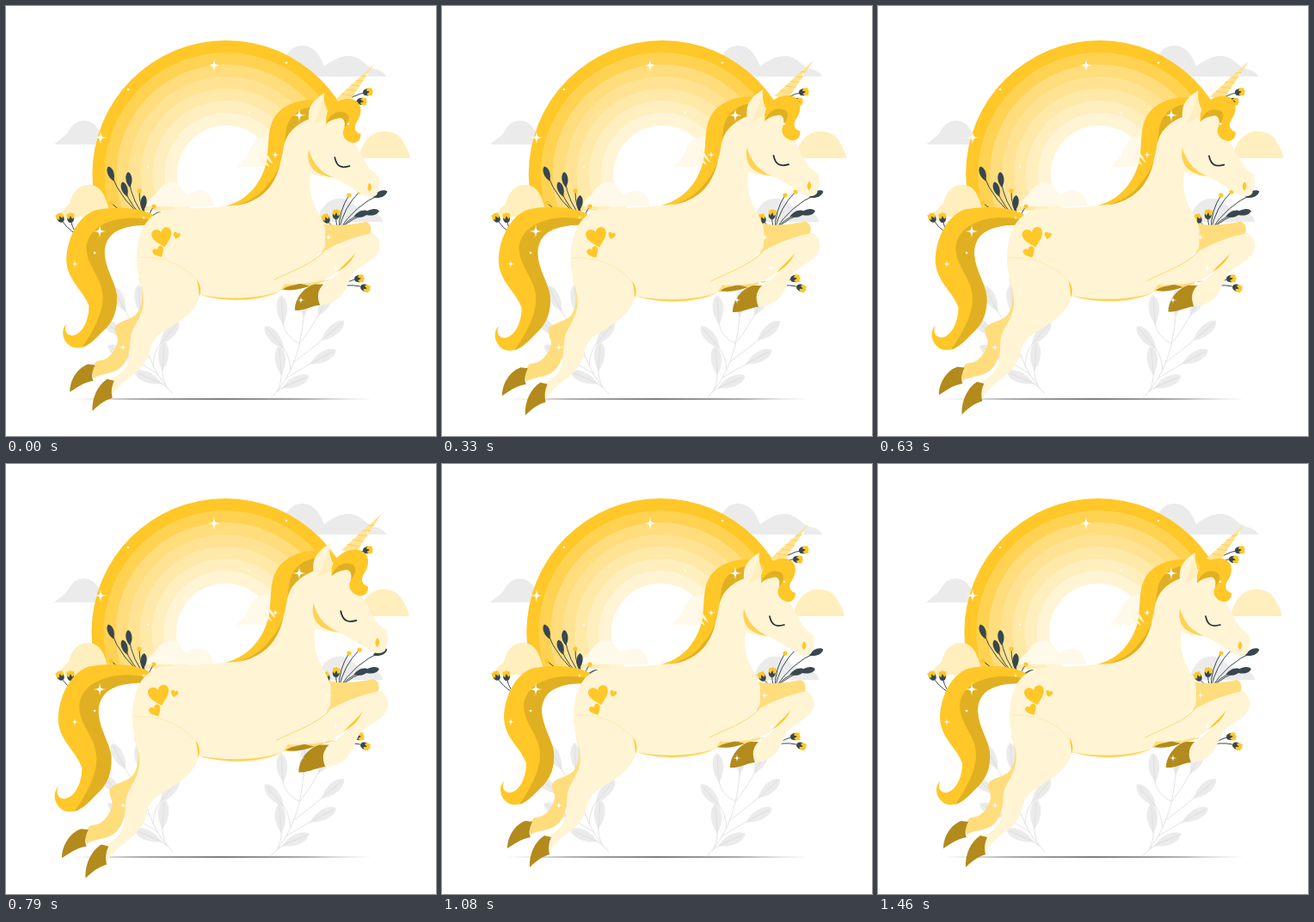
Recreate the animation shown at these times as an HTML page. Size 500 by 500 pixels, loop 1500 ms.

```html
<!DOCTYPE html>
<html lang="en">
<head>
<meta charset="utf-8">
<title>Leaping unicorn</title>
<style>
html, body { margin: 0; width: 100%; height: 100%; overflow: hidden; background: #fff; }
svg { display: block; width: 100vw; height: 100vh; }
.gold { fill: #ffc727; }
.dark { fill: #e0b022; }
.hoof { fill: #b38a1c; }
.tan { fill: #ffdd7d; }
.cream { fill: #fff4d4; }
.mist { fill: #fff9e9; }
.haze { fill: #ffeebe; }
.grey { fill: #ebebeb; }
</style>
</head>
<body>
<svg viewBox="0 0 500 500" fill="none" stroke-linecap="round" stroke-linejoin="round">
  <defs>
    <clipPath id="horizon"><path d="M90 30H400V130L345 170V238H90Z"/></clipPath>
    <linearGradient id="ground"><stop stop-color="#aaa"/><stop offset=".2" stop-color="#555"/><stop offset=".8" stop-color="#555"/><stop offset="1" stop-color="#aaa"/></linearGradient>
  </defs>

  <g class="grey">
    <path d="M56 161C64 154 68 152 72 147C78 134 88 132 96 134C105 137 110 147 118 161Z"/>
    <path d="M318 82C322 60 330 46 344 46C358 46 365 57 370 70C379 63 390 57 401 58C414 60 419 71 428 73C436 75 440 77 442 82Z"/>
  </g>
  <path d="M72 457Q250 455.700 428 457Q250 458.300 72 457Z" fill="url(#ground)"/>
  <g id="shrubs"></g>

  <g id="sky">
    <g id="rainbow" clip-path="url(#horizon)"></g>
    <path class="haze" d="M62 245C64 239 69 235 74 230C78 213 87 207 99 208C112 210 117 223 122 245Z"/>
    <path class="mist" d="M269 187C276 180 280 177 283 169C288 156 297 150 309 151L322 187Z"/>
    <path class="haze" d="M410 177C414 160 422 148 436 146C450 145 459 150 463 160C467 166 469 171 470 177Z"/>
    <path class="mist" d="M163 233C166 223 172 222 176 216C182 206 194 201 202 209C206 213 207 218 211 219C222 212 236 214 239 223C241 226 242 229 242 233Z"/>
  </g>

  <path class="grey" d="M362 251C366 232 377 222 392 224C405 227 408 239 421 239C430 240 437 243 438 251Z"/>
  <g id="flowers"></g>

  <g id="unicorn">
    <path class="gold" d="M172 243C155 234 125 233 104 238C83 247 73 272 72 294C72 318 92 330 98 348C98 365 90 381 79 382C72 382 69 376 72 369C66 374 66 388 78 395C92 400 103 389 113 378C127 366 131 352 130 335C128 320 117 306 116 288C116 268 128 255 166 255Z"/>
    <path class="dark" d="M168 249C140 242 98 250 95 280C95 303 114 315 114 338C114 358 102 378 90 396C100 392 105 386 113 378C127 366 131 352 130 335C128 320 117 306 116 288C116 268 128 255 166 255Z"/>

    <path class="tan" d="M155 315C162 335 160 349 152 358C143 365 132 365 128 372C127 379 132 383 131 389C129 397 125 403 121 406C116 411 111 410 106 412L101 420L103 431C113 425 124 427 133 420C147 409 144 393 149 378C156 366 170 350 170 330Z"/>
    <path class="hoof" d="M76 447C76 433 85 419 97 415L105 416C101 424 101 430 103 434C91 436 84 442 76 447Z"/>

    <path class="tan" d="M366 253C385 257 402 254 417 251C424 254 424 262 420 270L366 290ZM314 319L376 318L350 326C338 330 326 330 317 330Z"/>
    <path class="hoof" d="M321 329C327 324 334 325 340 322L352 325C341 329 331 331 321 329Z"/>

    <path class="cream" d="M355 128C370 118 388 125 395 137C400 154 410 172 421 190C427 196 433 197 432 203C434 210 430 215 430 219C427 224 418 224 412 219C400 213 388 202 376 200C368 199 360 199 353 195C351 208 352 222 360 237C366 248 371 256 370 264C369 275 372 280 366 285C350 300 330 310 318 331C300 345 255 344 225 335C225 345 215 357 200 367C185 377 173 381 169 396C166 411 158 421 146 429C136 437 128 444 123 455L113 436C125 433 141 425 144 409C147 395 143 385 149 374C157 360 163 350 160 333C157 318 152 305 153 290C154 265 163 243 185 238C210 234 240 237 265 231C290 222 310 190 318 165C325 145 338 132 355 128Z"/>
    <path class="hoof" d="M102 469C101 454 108 439 119 432L127 434C123 443 124 449 125 454C115 457 108 463 102 469Z"/>

    <path class="cream" d="M309 318C335 305 355 296 370 284C388 274 405 268 424 264C432 268 434 276 432 284C426 297 408 303 402 310C396 322 392 335 383 341C377 345 370 347 364 347L359 326C372 322 383 314 390 304C378 316 362 322 345 322C330 324 320 323 309 318Z"/>
    <path class="hoof" d="M335 353C335 339 346 326 358 323L368 323C360 331 361 339 364 347C354 348 345 354 335 353Z"/>
    <path class="gold" d="M405 286C399 295 393 298 384 309C394 302 400 298 405 286ZM222 318Q229 326 225 338Q225 327 222 318Z"/>
    <path d="M311 318C330 308 352 302 368 286" stroke="#ffd252" stroke-width=".8"/>
    <path d="M226 335C250 343 290 344 318 331C290 341 250 340 226 335Z" fill="#ffd252"/>
    <path d="M155 292C180 291 207 299 222 319" stroke="#ffe393" stroke-width=".6"/>

    <path d="M351 168C348 186 356 197 379 200C365 194 356 185 351 168Z" fill="#ffd252"/>
    <path d="M381 177C383 187 388 190 398 187" stroke="#263238" stroke-width="1.700"/>
    <path class="gold" d="M421 206C424 209 424 213 421 216C418 214 418 210 421 206Z"/>

    <path class="gold" d="M364 112C345 108 322 115 312 130C302 146 306 165 302 184C296 206 282 226 255 233C283 232 301 221 310 205C322 186 318 165 328 150C338 137 350 133 362 128Z"/>
    <path class="dark" d="M362 119C345 117 328 127 325 146C321 170 321 190 304 208C294 222 279 230 263 233C285 231 302 220 310 205C322 186 318 165 328 150C338 137 350 133 361 130Z"/>
    <path class="cream" d="M298 169Q305 174 310 185Q301 179 298 169ZM296 177Q302 180 306 188Q299 185 296 177Z"/>

    <path d="M426 70L382 110L396 115Z" fill="#ffe393"/>
    <g id="horn"></g>
    <path class="gold" d="M371 128C376 114 390 108 401 110C413 113 413 126 407 135C402 142 404 148 411 150C411 157 407 161 401 160C392 158 388 150 392 143C396 136 395 130 388 130C380 130 375 134 371 139Z"/>
    <path class="dark" d="M371 138C376 126 385 122 394 126C400 130 396 138 392 143C394 135 390 130 385 132Q377 133 371 138Z"/>
    <path class="cream" d="M369 103C359 109 351 117 351 127C350 133 352 138 356 140C366 137 373 131 372 124C369 116 368 110 369 103Z"/>
    <path class="haze" d="M368 110C363 119 364 126 356 139C368 135 372 130 371 124C368 118 368 115 368 110Z"/>

    <g id="hearts" class="gold"></g>
  </g>
  <g id="sparks" fill="#fff"></g>
</svg>

<script>
const NS = "http://www.w3.org/2000/svg";
const LOOP = 1500, LEAD = 14;
const INK = "#37474f", GOLD = "#ffc727";
const $ = id => document.getElementById(id);
const mix = (a, b, t) => a + (b - a) * t;
const tint = t => `rgb(${[255, 199, 39].map(v => Math.round(mix(v, 255, t)))})`;
const curve = (a, b, c, t) => a.map((v, i) => mix(mix(v, b[i], t), mix(b[i], c[i], t), t));

function add(parent, tag, attrs) {
  const el = document.createElementNS(NS, tag);
  for (const k in attrs) el.setAttribute(k, attrs[k]);
  return parent.appendChild(el);
}
const dot = (g, cx, cy, r, fill) => add(g, "circle", { cx, cy, r, fill });

// Point at a distance from (x, y); 0 degrees is up, clockwise
function step([x, y], turn, dist) {
  const a = turn * Math.PI / 180;
  return [x + Math.sin(a) * dist, y - Math.cos(a) * dist];
}

// Stalk that reaches its end in the given direction
function stalk(g, from, to, turn, stroke, width) {
  const reach = Math.hypot(to[0] - from[0], to[1] - from[1]) / 2;
  add(g, "path", { d: `M${from}Q${step(to, turn, -reach)} ${to}`, stroke, "stroke-width": width });
}

function leaf(g, [x, y], turn, len, wide, fill, vein) {
  const h = len / 2, w = wide * 0.68;
  const transform = `translate(${x} ${y}) rotate(${turn})`;
  add(g, "path", { transform, fill, d: `M0 ${h}C${-w} ${h / 3} ${-w} ${-h * 0.7} 0 ${-h}C${w} ${-h * 0.7} ${w} ${h / 3} 0 ${h}Z` });
  if (vein) add(g, "path", { transform, stroke: vein, "stroke-width": 0.8, d: `M0 ${h}V${-h * 0.75}` });
}

function tulip(g, [x, y], turn) {
  const transform = `translate(${x} ${y}) rotate(${turn})`;
  add(g, "path", { transform, d: "M-4 -5Q-2 -4 0 -6Q2 -4 4 -5Q6 4 0 6Q-6 4 -4 -5Z", fill: GOLD });
  add(g, "path", { transform, d: "M-4 0L-2 2L0 -2L2 2L4 0Q4 6 0 6Q-4 6 -4 0Z", fill: INK });
}

// All stems leave one root and bend clockwise
function bouquet(root, { leaves = [], tulips = [], berries = [] }) {
  const g = $("flowers"), bend = 18;
  const grow = (heads, draw) => heads.forEach(p => {
    const turn = Math.atan2(p[0] - root[0], root[1] - p[1]) * 180 / Math.PI + bend;
    stalk(g, root, p, turn, INK, 1);
    draw(p, turn);
  });
  grow(berries, p => dot(g, ...p, 2.6, GOLD));
  grow(tulips, (p, turn) => tulip(g, p, turn));
  grow(leaves, (p, turn) => leaf(g, p, turn, 18, 7, INK));
}

// Outer leaves follow one arc, inner leaves another
function shrub(transform) {
  const g = add($("shrubs"), "g", { transform });
  const root = [308, 456], mid = [345, 420], top = [347, 345];
  const put = (p, turn, t) => {
    stalk(g, curve(root, mid, top, 0.1 + t * 0.55), step(p, turn, -15), turn, "#e4e4e4", 1);
    leaf(g, p, turn, 34, 12, "#ebebeb", "#dcdcdc");
  };
  add(g, "path", { d: `M${root}Q${mid} ${top}`, stroke: "#e4e4e4" });
  for (let t = 0; t <= 1; t += 1 / 3) put(curve([337, 437], [400, 395], [371, 345], t), 66 - 38 * t * t, t);
  for (let t = 0; t <= 1; t += 1 / 2) put(curve([319, 412], [304, 388], [321, 353], t), -4 - 36 * Math.sin(Math.PI * t), t);
  leaf(g, top, 3, 32, 11, "#ebebeb", "#dcdcdc");
}

function heart(x, y, size, turn) {
  add($("hearts"), "path", {
    transform: `translate(${x} ${y}) rotate(${turn}) scale(${size})`,
    d: "M0 1C-.5 .5 -1 .1 -1 -.4C-1 -1 -.2 -1.100 0 -.5C.2 -1.100 1 -1 1 -.4C1 .1 .5 .5 0 1Z"
  });
}

function spark([x, y], r) {
  add($("sparks"), "path", {
    transform: `translate(${x} ${y}) scale(${r})`,
    d: "M0 -1C.1 -.1 .1 -.1 1 0C.1 .1 .1 .1 0 1C-.1 .1 -.1 .1 -1 0C-.1 -.1 -.1 -.1 0 -1Z"
  });
}

function build() {
  const bands = 7;
  for (let i = 0; i < bands; i++) {
    dot($("rainbow"), 256, 195.5, 155.5 - i * 14, tint(i < 2 ? i / 5 : 0.2 + i / 10));
  }
  dot($("rainbow"), 256, 196, 57, "#fff");

  shrub("");
  shrub("translate(502 -5) scale(-1 1)");

  bouquet([165, 250], {
    leaves: [[122, 195], [138, 213], [143, 202], [160, 229], [178, 243]],
    berries: [[155, 215], [172, 233], [122, 229]]
  });
  bouquet([83, 266], { tulips: [[63, 246], [75, 246]] });
  bouquet([387, 261], {
    leaves: [[435, 219], [425, 240], [413, 242]],
    tulips: [[372, 247], [384, 242]],
    berries: [[399, 220], [411, 216]]
  });
  bouquet([385, 118], { tulips: [[421, 100], [414, 111]] });
  bouquet([390, 326], { tulips: [[411, 317], [418, 328]] });

  for (let t = 0.15; t < 0.8; t += 0.13) {
    const left = [mix(382, 426, t), mix(110, 70, t)], right = [mix(396, 426, t + 0.04), mix(115, 70, t + 0.04)];
    add($("horn"), "path", { d: `M${left}L${right}`, stroke: "#ffd252" });
  }

  heart(182.5, 269, 11.5, -14);
  heart(199, 267, 4, 15);
  heart(178.5, 286, 6.5, -28);

  [[242, 69], [110, 153], [109, 262], [341, 127]].forEach(p => spark(p, 8));
  [[80, 300], [313, 173], [375, 269], [383, 305], [343, 342], [136, 397], [370, 322]].forEach(p => spark(p, 4.5));
  [[283, 124], [165, 187], [160, 246], [420, 80]].forEach(p => spark(p, 3));
  [[142, 97], [326, 66], [398, 137], [103, 287]].forEach(p => dot($("sparks"), ...p, 1.3, "#fff"));
}

// Linear interpolation between [position, value] stops
function track(stops, p) {
  let i = 1;
  while (i < stops.length - 1 && p > stops[i][0]) i++;
  const [a, u] = stops[i - 1], [b, v] = stops[i];
  return mix(u, v, (p - a) / (b - a));
}
const beat = [[0, 1], [.1, 1.1], [.3, 1], [.4, 1], [.5, 1.1], [.6, 1], [1, 1]];
const shake = [0, -1, 2, -4, 4, -4, 4, -4, 2, -1, 0].map((x, i) => [i / 10, x]);

function draw(ms) {
  const p = ((ms + LEAD) % LOOP) / LOOP;
  $("unicorn").setAttribute("transform", `translate(250.5 268) scale(${track(beat, p)}) translate(-250.5 -268)`);
  $("sky").setAttribute("transform", `translate(${track(shake, p)} 0)`);
}

build();
const start = performance.now();
function tick() {
  draw(performance.now() - start);
  requestAnimationFrame(tick);
}
draw(0);
requestAnimationFrame(tick);
</script>
</body>
</html>
```
